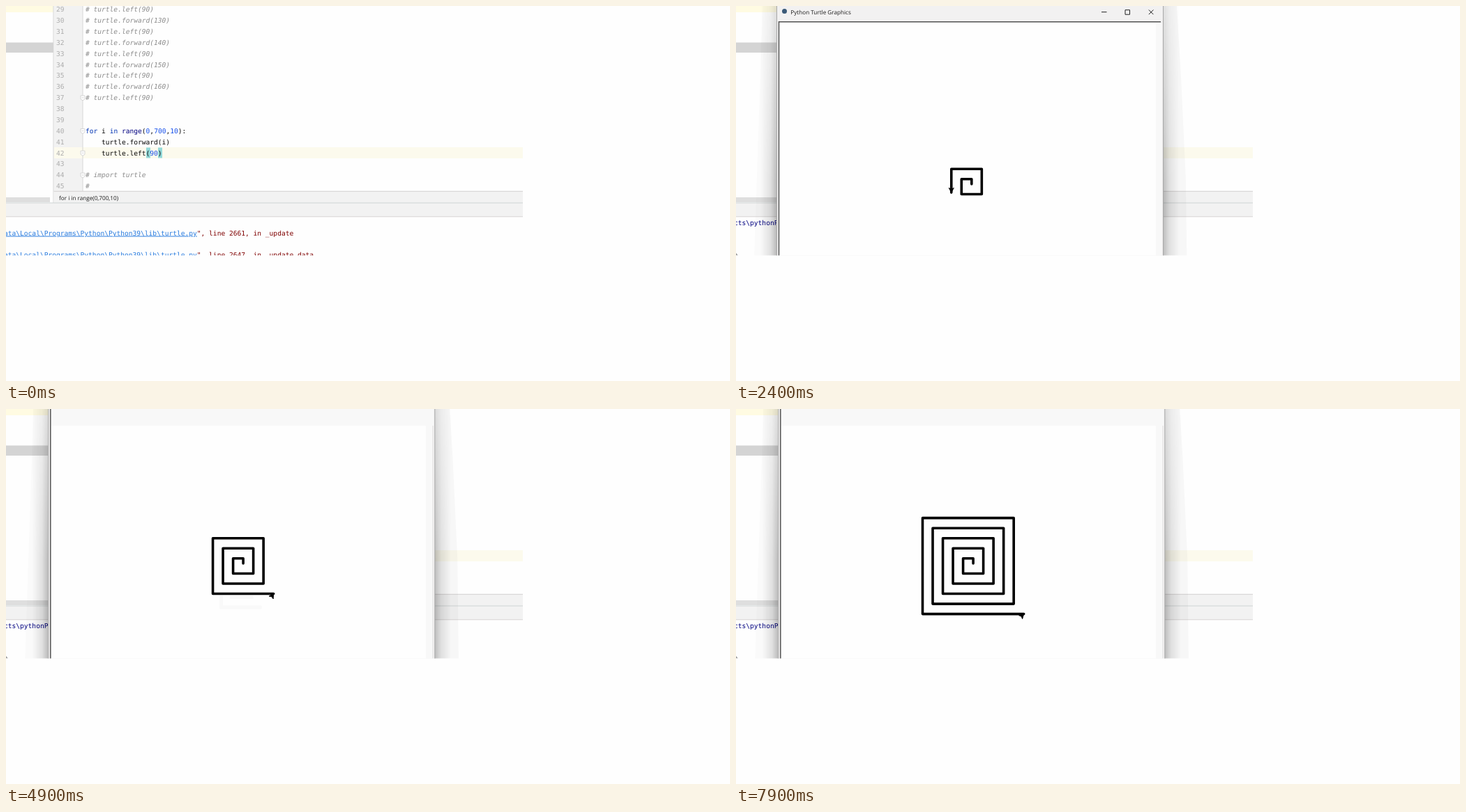
These frames come from a looping animation (1038x539 px, 8000 ms). An HTML page:

```html
<!DOCTYPE html>
<html lang="en">
<head>
<meta charset="utf-8">
<title>Square spiral</title>
<style>
  html, body { margin: 0; width: 100%; height: 100%; overflow: hidden; background: #fefefe; }
  svg { display: block; width: 1038px; height: 539px; }
  text { white-space: pre; text-rendering: geometricPrecision; }
  .mono { font: 9.58px "DejaVu Sans Mono", monospace; fill: #080808; }
  .ui { font: 8.17px "Open Sans", sans-serif; fill: #1c1c1c; }
  .note { fill: #8c8c8c; font-style: italic; }
  .num { fill: #adadad; }
  .key { fill: #0033b3; }
  .fn { fill: #000080; }
  .lit { fill: #1750eb; }
  .link { fill: #287bde; text-decoration: underline; }
  .err { fill: #7f0000; }
  .cmd { fill: #000080; }
</style>
</head>
<body>
<svg viewBox="0 0 1038 539">
  <defs>
    <clipPath id="screen"><rect width="1038" height="358.5"/></clipPath>
    <clipPath id="ghostClip"><rect id="ghostArea" x="290" y="254" width="100" height="60"/></clipPath>
    <linearGradient id="shadeR">
      <stop offset="0" stop-opacity=".24"/><stop offset=".4" stop-opacity=".09"/><stop offset="1" stop-opacity="0"/>
    </linearGradient>
    <linearGradient id="shadeL" x1="1" x2="0">
      <stop offset="0" stop-opacity=".27"/><stop offset=".4" stop-opacity=".1"/><stop offset="1" stop-opacity="0"/>
    </linearGradient>
    <linearGradient id="fade" x2="0" y2="1">
      <stop offset="0" stop-color="#666"/><stop offset=".6" stop-color="#fff"/>
    </linearGradient>
    <mask id="deep" maskUnits="userSpaceOnUse" x="0" y="0" width="700" height="420">
      <rect width="700" height="420" fill="url(#fade)"/>
    </mask>
  </defs>

  <g clip-path="url(#screen)">
    <!-- editor -->
    <rect y="0" width="68" height="9" fill="#fffbe2"/>
    <rect y="52.5" width="68" height="14.5" fill="#d4d4d4"/>
    <rect y="275" width="63" height="7" fill="#dedede"/>
    <rect x="69" width="41" height="266" fill="#f2f2f2"/>
    <rect x="67.5" width="1" height="283" fill="#d3d3d3"/>
    <rect x="69" y="203" width="672" height="16" fill="#fcfaed"/>
    <rect x="109.5" width="1" height="266" fill="#d6d6d6"/>
    <g id="parens" fill="#93d9d9">
      <rect x="201" y="203.5" width="6" height="15"/>
      <rect x="218" y="203.5" width="6" height="15"/>
    </g>
    <g id="code"></g>
    <rect x="68.5" y="266" width="672.5" height="17" fill="#f2f2f2"/>
    <rect x="68.5" y="265.8" width="672.5" height="1" fill="#d4d2d2"/>
    <text class="ui" x="76" y="278.6">for i in range(0,700,10)</text>
    <rect y="283" width="741" height="20" fill="#f2f2f2"/>
    <rect y="282.5" width="741" height="1" fill="#d0d6d6"/>
    <rect y="302.3" width="741" height="1" fill="#d8d4d4"/>
    <g id="trace"></g>
    <g id="command">
      <text class="mono cmd" x="-3" y="314.6">cts\pythonProject\venv\Scripts\python.exe C:/Users/admin/PycharmProjects/pythonProject/turtle_square.py</text>
    </g>
    <path id="corner" d="M0 355L3 358.5H0Z" fill="#999"/>

    <!-- turtle window -->
    <g id="window">
      <path d="M612 0H632L638 100L645 250L647 420H612Z" fill-opacity=".026"/>
      <path d="M59 0H38L33 150L24 420H59Z" fill-opacity=".016"/>
      <g mask="url(#deep)">
        <rect x="612" width="24" height="420" fill="url(#shadeR)"/>
        <rect x="35" width="24" height="420" fill="url(#shadeL)"/>
      </g>
      <rect x="58.5" y="-3" width="554" height="430" fill="#f2f1f1" stroke="#a9a9a9"/>
      <rect x="61" y="22" width="548.5" height="400" fill="#fefefe"/>
      <path d="M61.5 420V22.8H609" fill="none" stroke="#525252" stroke-width="1.5"/>
      <path d="M609.5 23V420" stroke="#e2e2e2"/>
      <circle cx="69.5" cy="7.5" r="3.5" fill="#3b5a78"/>
      <text class="ui" x="78.3" y="11.5">Python Turtle Graphics</text>
      <path d="M524 8.7H531.5M558 5.7H564.5V12.2H558ZM591.8 5.5L598.4 12.1M598.4 5.5L591.8 12.1" fill="none" stroke="#222"/>
    </g>
    <rect id="rightVeil" x="602" y="24" width="8.5" height="340" fill="#f8f8f8"/>
    <rect id="topVeil" x="65" y="0" width="548" height="24" fill="#f8f8f8"/>
    <g id="ghost" clip-path="url(#ghostClip)">
      <path id="ghostLine" fill="none" stroke="#f9f9f9" stroke-width="5"/>
    </g>
    <g id="drawing">
      <path id="line" fill="none" stroke="#000" stroke-width="3.6" stroke-linecap="round" stroke-linejoin="round"/>
      <path id="arrow" d="M0 0L-6.5 -3.6L-5.1 0L-6.5 3.6Z" stroke="#000" stroke-width=".8"/>
    </g>
  </g>
</svg>
<script>
const $ = id => document.getElementById(id);
const LOOP = 8000, TICK = 100;

// Editor text
const span = (cls, s) => `<tspan class="${cls}">${s}</tspan>`;
const source = {
  40: span('key', 'for') + ' i ' + span('key', 'in') + ' ' + span('fn', 'range') + '(' +
      [0, 700, 10].map(n => span('lit', n)).join(',') + '):',
  41: '    turtle.forward(i)',
  42: '    turtle.left(' + span('lit', 90) + ')',
  44: span('note', '# import turtle'),
  45: span('note', '#')
};
for (let n = 29; n <= 37; n++) {
  const call = n % 2 ? 'left(90)' : `forward(${130 + (n - 30) * 5})`;
  source[n] = span('note', '# turtle.' + call);
}
let rows = '';
for (let n = 29; n <= 45; n++) {
  const mid = 4.8 + (n - 29) * 15.88, base = mid + 3.3;
  rows += `<text class="mono num" x="72" y="${base}">${n}</text>`;
  rows += `<text class="mono" x="114" y="${base}">${source[n] || ''}</text>`;
  if ([37, 40, 42, 44].includes(n))
    rows += `<path d="M107 ${mid - 3}h6v5l-3 2l-3 -2ZM108.5 ${mid}h3" fill="#fefefe" stroke="#cfcfcf" stroke-width=".8"/>`;
}
$('code').innerHTML = rows;

const traceRow = (y, tail) => `<text class="mono err" x="-3" y="${y}">` +
  span('link', 'ata\\Local\\Programs\\Python\\Python39\\lib\\turtle.py') + `", ${tail}</text>`;
$('trace').innerHTML = traceRow(329.6, 'line 2661, in _update') + traceRow(361.2, 'line 2647, in _update_data');

// Spiral: each side is drawn in hops, each corner turned in 11 steps
const UNIT = 0.726, TURN = 11, HOP = 11.98;
const DIRS = [[1, 0], [0, -1], [-1, 0], [0, 1]];

function spiral(steps) {
  let x = 337.8, y = 256, d = `M${x} ${y}L${x} ${y}`, heading = 0;
  for (let side = 0; steps >= 0; side++) {
    if (side) {
      const hops = 1 + Math.floor(side * 10 / HOP);
      const len = side * 10 * UNIT * Math.min(1, steps / hops);
      x += DIRS[side % 4][0] * len;
      y += DIRS[side % 4][1] * len;
      d += `L${x.toFixed(2)} ${y.toFixed(2)}`;
      steps -= hops;
      if (steps <= 0) break;
    }
    heading += 90 * Math.min(1, steps / TURN);
    steps -= TURN;
    if (steps <= 0) break;
  }
  return { x, y, d, heading };
}

// Linear interpolation through [time, value] points
function track(points, t) {
  if (t <= points[0][0]) return points[0][1];
  for (let i = 1; i < points.length; i++) {
    const [t0, a] = points[i - 1], [t1, b] = points[i];
    if (t <= t1) return a + (b - a) * (t - t0) / (t1 - t0);
  }
  return points[points.length - 1][1];
}

const pace = [[800, 0], [900, 5.5], [2400, 102], [3000, 141], [3800, 141], [3900, 146.5], [5800, 269], [7900, 411.5]];
const dragX = [[2900, 0], [3000, -0.7], [3100, -1.3], [3200, 0.5], [3300, 2.3]];
const dragY = [[2900, 0], [3000, -3], [3100, -8.5], [3200, -22], [3300, -34]];

const show = (id, on) => $(id).setAttribute('visibility', on ? 'visible' : 'hidden');
$('ghostLine').setAttribute('d', spiral(122).d);

function render(t) {
  const open = t >= 800;
  show('parens', t < 500);
  show('trace', t < 500);
  show('command', t >= 600);
  show('corner', t >= 600);
  show('window', open);
  show('drawing', open);
  show('rightVeil', t >= 1000);
  show('topVeil', t >= 3300);
  show('ghost', t >= 3000 && t < 6600);
  $('ghostArea').setAttribute('y', t < 3300 ? 280 : t < 4800 ? 255 : 268);

  const place = t < 1000 ? 'translate(-.35 0) scale(.989)' : `translate(${track(dragX, t)} ${track(dragY, t)})`;
  $('window').setAttribute('transform', place);
  $('drawing').setAttribute('transform', place);

  const pen = spiral(track(pace, t));
  $('line').setAttribute('d', pen.d);
  $('arrow').setAttribute('transform', `translate(${pen.x} ${pen.y}) rotate(${-pen.heading})`);
}

const start = performance.now();
function frame() {
  const t = (performance.now() - start) % LOOP;
  render(Math.floor(t / TICK) * TICK);
  requestAnimationFrame(frame);
}
frame();
</script>
</body>
</html>
```
